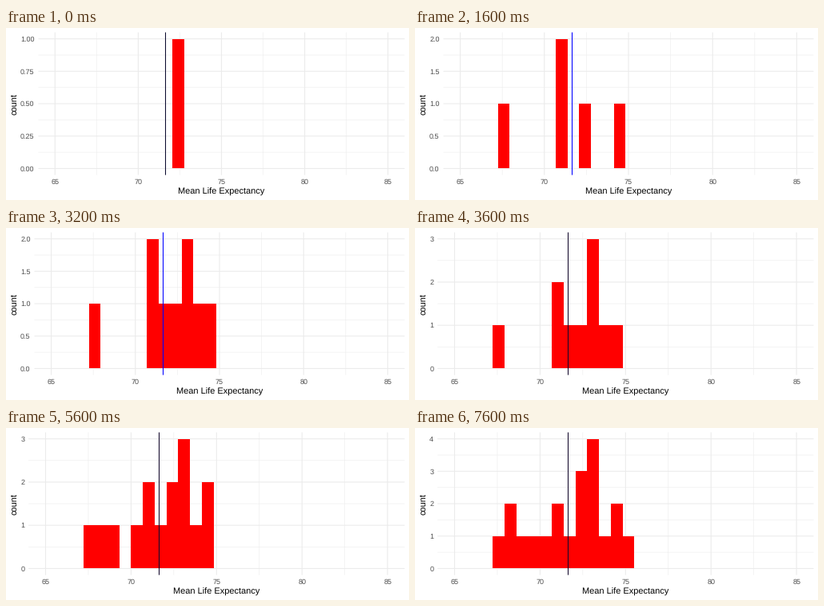
Write a matplotlib script that moves like this. It is 504 by 216 pixels and loops after 8000 ms.

```python
import matplotlib.pyplot as plt
import numpy as np
from matplotlib.animation import FuncAnimation
from matplotlib.patches import Rectangle

W, H, DPI = 504, 216, 72
plt.rcParams.update({
    "font.family": "Liberation Sans",
    "text.hinting": "none",
    "text.hinting_factor": 1,
})

TOP, RIGHT, BOTTOM = 5.5, 498.5, 184.6
X_MIN, X_MAX = 64, 86
MEAN = 71.65
BIN = 20 / 29
FIRST_EDGE = 97.5 * BIN

# Bin that receives each new sample mean, counted from the leftmost bin
SAMPLES = [7, 10, 5, 0, 5, 8, 9, 8, 6, 8, 10, 7, 1, 2, 4, 7, 3, 11, 8, 1]

# Highest count: (panel left edge, tick step, decimals, mean line colour)
LAYOUTS = {
    1: (40.45, 0.25, 2, "#0c0c30"),
    2: (35.5, 0.5, 1, "#0000ff"),
    3: (28.1, 1, 0, "#140a2c"),
    4: (28.1, 1, 0, "#140a2c"),
}

fig = plt.figure(figsize=(W / DPI, H / DPI), dpi=DPI, facecolor="white")
ax = fig.add_axes([0, 0, 1, 1])


def line(x, y, color, width, z):
    ax.plot(x, y, color=color, lw=width, zorder=z, snap=False,
            solid_capstyle="butt")


def label(x, y, text, size=8.8, color="#4d4d4d", ha="center", **kw):
    ax.text(x, y, text, size=size, color=color, ha=ha, va="baseline", **kw)


def draw(frame):
    ax.clear()
    ax.set(xlim=(0, W), ylim=(H, 0))
    ax.axis("off")

    counts = np.bincount(SAMPLES[:frame + 1], minlength=12)
    peak = counts.max()
    left, step, decimals, mean_color = LAYOUTS[peak]
    pad = (BOTTOM - TOP) / 22

    def px(value):
        return left + (value - X_MIN) / (X_MAX - X_MIN) * (RIGHT - left)

    def py(count):
        return BOTTOM - pad - count / peak * (BOTTOM - TOP - 2 * pad)

    def grid_x(value, width):
        line([px(value)] * 2, [TOP, BOTTOM], "#ebebeb", width, 1)

    def grid_y(count, width):
        line([left, RIGHT], [py(count)] * 2, "#ebebeb", width, 1)

    for value in np.arange(67.5, 85, 5):
        grid_x(value, 0.53)
    for count in np.arange(step / 2, peak, step):
        grid_y(count, 0.53)
    for value in range(65, 86, 5):
        grid_x(value, 1.07)
        label(px(value), 196, str(value))
    for count in np.arange(0, peak + step / 2, step):
        grid_y(count, 1.07)
        label(left - 4.9, py(count) + 3.2, f"{count:.{decimals}f}", ha="right")

    base = round(py(0))
    for k, count in enumerate(counts):
        if count:
            x0, x1 = (round(px(FIRST_EDGE + i * BIN)) for i in (k, k + 1))
            y = round(py(count))
            ax.add_patch(Rectangle((x0, y), x1 - x0, base - y, color="#ff0000",
                                   lw=0, antialiased=False, zorder=2))

    mean_x = int(px(MEAN)) + 0.5
    line([mean_x] * 2, [TOP, BOTTOM], mean_color, 1.07, 3)

    label((left + RIGHT) / 2, 209, "Mean Life Expectancy", 11, "black")
    ax.text(13.5, (TOP + BOTTOM) / 2, "count", size=11, color="black",
            rotation=90, rotation_mode="anchor", ha="center", va="baseline")
    return []


anim = FuncAnimation(fig, draw, frames=len(SAMPLES), interval=400,
                     init_func=lambda: [], repeat=True, repeat_delay=0)
plt.show()
```
